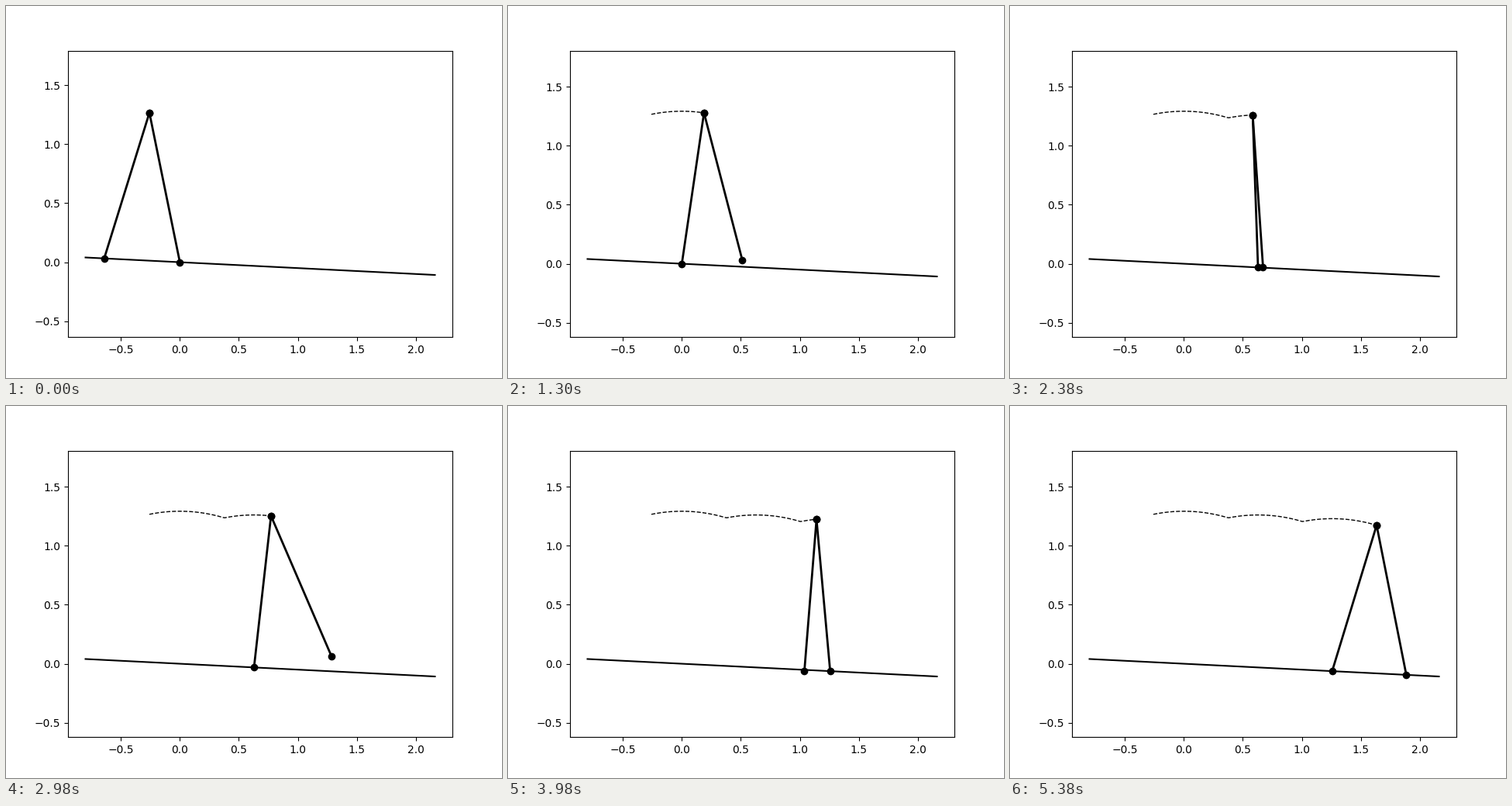
Write a matplotlib script that moves like this. It is 640x480 px and loops after 5.4 s.

```python
import numpy as np
import matplotlib.pyplot as plt
from matplotlib.animation import FuncAnimation

LEG = 1.2925
SLOPE = 0.05
HALF = 0.2459                     # half the angle between the legs at heel strike
FIRST_HALF = 0.251
GROWTH = 1.68                     # inverted-pendulum growth over one step
STRIKES = [0, 59.6, 120.2, 180]
PUSH = [0.087, 0.315, 0.346]      # how far each step throws the swing leg ahead
STEPS = 181


def pose(k):
    """Stance foot, hip and swing foot at animation step k."""
    n = min(int(np.searchsorted(STRIKES, k, side="right")) - 1, 2)
    u = (k - STRIKES[n]) / (STRIKES[n + 1] - STRIKES[n])
    begin = HALF if n else FIRST_HALF

    # stance leg falls like an inverted pendulum
    theta = ((SLOPE - begin) * np.sinh(GROWTH * (1 - u))
             + (SLOPE + HALF) * np.sinh(GROWTH * u)) / np.sinh(GROWTH)
    # angle between the legs swings like a plain pendulum
    half = begin + (HALF - begin) * u
    phi = PUSH[n] * np.sin(np.pi * u) - 2 * half * np.cos(np.pi * u) - theta

    stride = n * 2 * LEG * np.sin(HALF)
    foot = stride * np.array([np.cos(SLOPE), -np.sin(SLOPE)])
    hip = foot + LEG * np.array([np.sin(theta), np.cos(theta)])
    swing = hip + LEG * np.array([np.sin(phi), -np.cos(phi)])
    return foot, hip, swing


poses = np.array([pose(k) for k in range(STEPS)])
hips = poses[:, 1]

fig, ax = plt.subplots(figsize=(6.4, 4.8), dpi=100)
ground_x = np.array([-0.8, 2.162])
ground_y = -SLOPE * ground_x
ax.plot(ground_x, ground_y, "k-", lw=1.5)
trail, = ax.plot([], [], "k--", lw=1)
legs = [ax.plot([], [], "ko-", lw=2)[0] for _ in range(2)]

pad = 0.05 * np.ptp(ground_x)
ax.set_xlim(ground_x[0] - pad, ground_x[1] + pad)
box = ax.get_position()
half_height = (np.ptp(ground_x) / 2 + pad) * (box.height * 4.8) / (box.width * 6.4)


def update(i):
    k = (2 * i + 2) // 3          # two poses every three ticks
    foot, hip, swing = poses[k]
    for leg, end in zip(legs, (foot, swing)):
        leg.set_data([hip[0], end[0]], [hip[1], end[1]])
    trail.set_data(hips[:k + 1, 0], hips[:k + 1, 1])
    # the view stays centred on everything drawn so far
    mid = (ground_y[1] + hips[:k + 1, 1].max()) / 2
    ax.set_ylim(mid - half_height, mid + half_height)
    return [trail, *legs]


anim = FuncAnimation(fig, update, frames=270, interval=20, repeat=True,
                     repeat_delay=0, blit=False)
plt.show()
```
